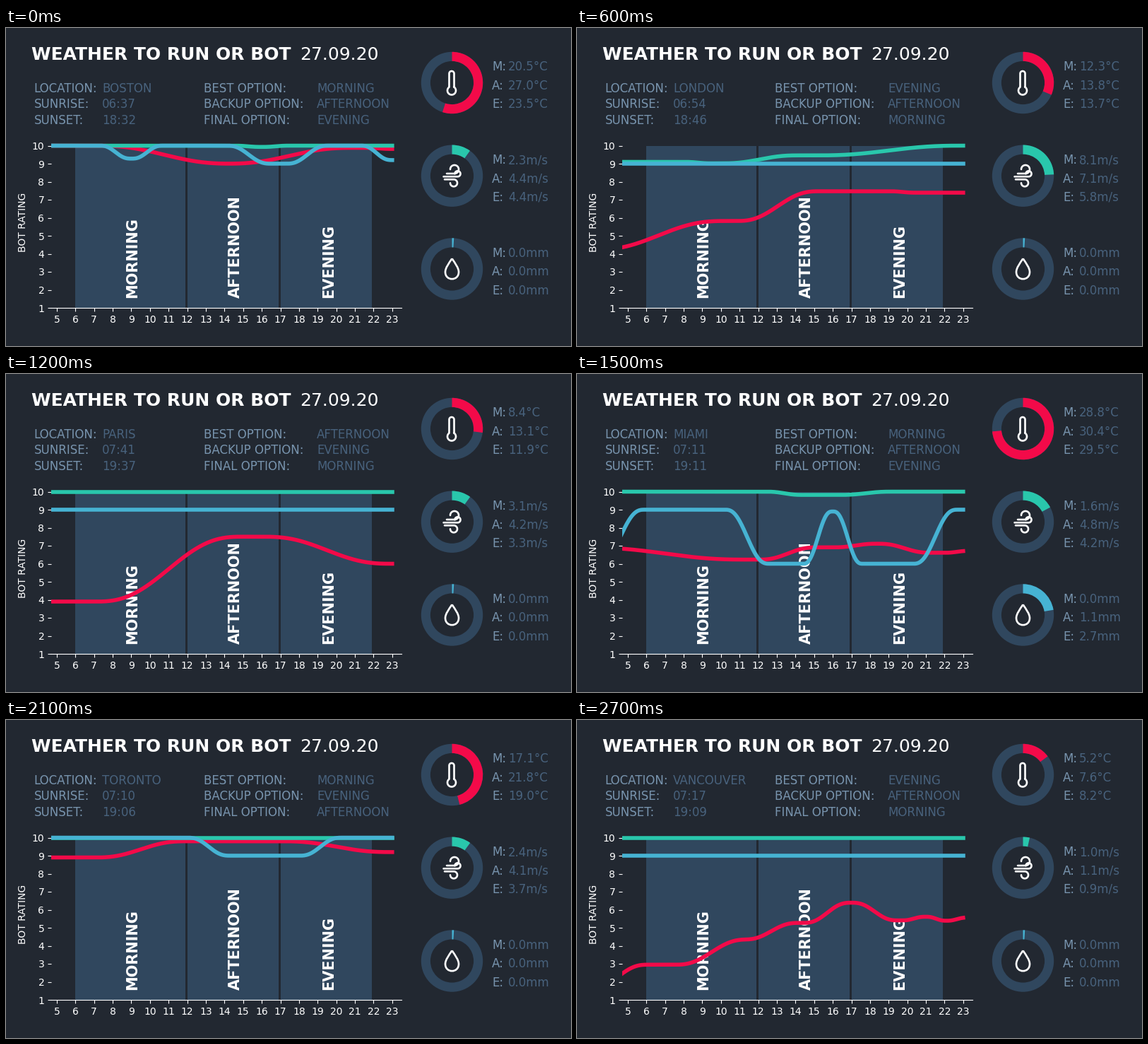
Animation, 800 px wide and 450 px high, one loop 3000 ms. Source, as a matplotlib script:

```python
import matplotlib.pyplot as plt
import numpy as np
from matplotlib.animation import FuncAnimation
from matplotlib.patches import PathPatch, Rectangle, Wedge
from matplotlib.path import Path

W, H, DPI = 800, 450, 100
BACK, PANEL = "#222831", "#30475e"
LABEL, VALUE = "#7894ae", "#48627d"
RED, TEAL, BLUE = "#f30a49", "#29c7ac", "#46b3d3"
PERIODS = {"M": "MORNING", "A": "AFTERNOON", "E": "EVENING"}
RING_X, RING_Y = 631.5, (77.5, 209.2, 341)
UNITS = ("°C", "m/s", "mm")

plt.rcParams["font.family"] = "DejaVu Sans"
cities = []


def curve(level, *moves, start=4):
    """Rating over the day: each move eases by `change` between two hours."""
    hours = np.linspace(start, 23, 500)
    ratings = np.full_like(hours, level)
    for begin, end, change in moves:
        t = np.clip((hours - begin) / (end - begin), 0, 1)
        ratings += change * t**3 * (6 * t * t - 15 * t + 10)
    return hours, ratings


def city(name, sunrise, sunset, order, temps, winds, rains=(0, 0, 0), *,
         heat, wind, red, teal=curve(10), blue=curve(9)):
    rain = max(0.01, sum(rains) / 17)
    cities.append(dict(facts=(name, sunrise, sunset), order=order,
                       readings=(temps, winds, rains),
                       shares=(heat, wind, rain), curves=(red, teal, blue)))


city("BOSTON", "06:37", "18:32", "MAE", (20.5, 27.0, 23.5), (2.3, 4.4, 4.4),
     heat=.55, wind=.099,
     red=curve(10, (7, 14.5, -1), (14, 21, .88), (21.5, 23, -.06)),
     teal=curve(10, (14.5, 16, -.07), (16, 17.5, .07)),
     blue=curve(10, (7.3, 9, -.72), (9, 10.7, .72), (14.1, 16.5, -1),
                (17.3, 19.6, 1), (21.3, 23, -.8)))

city("CHICAGO", "06:44", "18:40", "AME", (16.2, 19.4, 16.8), (3.6, 4.9, 5.2),
     heat=.41, wind=.13,
     red=curve(8.2, (7, 14, 1.6), (15, 23, -1.2)),
     blue=curve(10, (15, 17.3, -1)))

city("LONDON", "06:54", "18:46", "EAM", (12.3, 13.8, 13.7), (8.1, 7.1, 5.8),
     heat=.314, wind=.243,
     red=curve(4.22, (3, 10.3, 1.6), (10.8, 15.3, 1.65), (19, 20.5, -.08)),
     teal=curve(9.1, (8, 9.5, -.08), (10, 14.2, .44), (15, 23, .54)))

city("EDINBURGH", "07:08", "18:58", "AEM", (5.6, 11.0, 9.7), (1.3, 0.8, 1.1),
     heat=.198, wind=.023,
     red=curve(2.35, (5, 7, -.65), (6.8, 12.8, 4.7), (12, 15.5, .95),
               (16, 22.7, -2.85)),
     blue=curve(10, (11.4, 13.8, -1)))

city("PARIS", "07:41", "19:37", "AEM", (8.4, 13.1, 11.9), (3.1, 4.2, 3.3),
     heat=.27, wind=.1,
     red=curve(3.9, (7, 15, 3.6), (16, 23, -1.5)))

city("MIAMI", "07:11", "19:11", "MAE", (28.8, 30.4, 29.5), (1.6, 4.8, 4.2),
     (0, 1.1, 2.7), heat=.736, wind=.172,
     red=curve(6.9, (2.5, 11.5, -.67), (12, 15.2, .68), (16, 18.4, .2),
               (18.4, 21.3, -.5), (22, 23.3, .1)),
     teal=curve(10, (12.4, 14.4, -.18), (16.3, 19.2, .18)),
     blue=curve(6, (3.3, 5.9, 3), (10.2, 12.6, -3), (14.4, 16, 2.9),
                (16, 17.6, -2.9), (20.3, 22.7, 3)))

city("NEW YORK", "06:48", "18:44", "EMA", (21.6, 25.3, 23.6), (1.5, 3.6, 3.5),
     heat=.566, wind=.08,
     red=curve(9.82, (5.3, 7, .05), (7, 13.7, -.58), (14, 17.3, .21),
               (17.8, 19.2, .1), (22, 23, .07)),
     blue=curve(10, (8.2, 10.9, -1), (13.1, 15.6, 1), (21.3, 23, -.8)))

city("TORONTO", "07:10", "19:06", "MEA", (17.1, 21.8, 19.0), (2.4, 4.1, 3.7),
     heat=.46, wind=.1,
     red=curve(8.9, (7, 12, .9), (17, 23, -.6)),
     blue=curve(10, (12, 14.3, -1), (18, 20.3, 1)))

city("TOKYO", "05:32", "17:31", "AME", (20.8, 24.4, 23.1), (2.8, 2.8, 3.8),
     (.9, 0, 1.8), heat=.566, wind=.07,
     red=curve(10, (9.5, 14, -.4), (14.5, 17.2, .2), (19.5, 21, .08),
               (21, 22.4, -.17), start=7),
     teal=curve(10, start=7),
     blue=curve(8.6, (6.8, 8.5, -2.6), (8.5, 10.5, 3), (18.3, 21.2, -4),
                start=7))

city("VANCOUVER", "07:17", "19:09", "EAM", (5.2, 7.6, 8.2), (1.0, 1.1, 0.9),
     heat=.148, wind=.035,
     red=curve(1.58, (2.8, 6.1, 1.37), (7.5, 11.5, 1.4), (11.2, 14.2, .92),
               (14.4, 17, 1.12), (17, 19.5, -.98), (19.7, 21, .2),
               (21, 22.1, -.22), (22.1, 23.2, .17)))

fig = plt.figure(figsize=(W / DPI, H / DPI), dpi=DPI, facecolor=BACK)


def write(x, y, text="", color=VALUE, size=12, **style):
    return fig.text(x / W, 1 - y / H, text, color=color, fontsize=size, **style)


# Rating chart
chart = fig.add_axes([0.08, 0.12, 0.62, 242.25 / H])
chart.set(xlim=(4.7, 23.5), ylim=(1, 10.5), facecolor="none",
          xticks=range(5, 24), yticks=range(1, 11))
chart.set_ylabel("BOT RATING", color="white")
chart.tick_params(colors="white")
chart.spines[["left", "top", "right"]].set_visible(False)
chart.spines["bottom"].set_color("white")
for start, end, middle, text in ((6, 11.9, 9.07, "MORNING"),
                                 (12, 16.9, 14.6, "AFTERNOON"),
                                 (17, 21.9, 19.6, "EVENING")):
    chart.add_patch(Rectangle((start, 1), end - start, 9, color=PANEL, lw=0))
    chart.text(middle, 1.55, text, color="white", size=15, weight="bold",
               rotation=90, ha="center", va="bottom", zorder=1.5)
lines = [chart.plot([], [], color=c, lw=4, solid_capstyle="projecting",
                    zorder=3)[0] for c in (RED, TEAL, BLUE)]

# Rings and icons, in stage pixels
stage = fig.add_axes([0, 0, 1, 1], facecolor="none")
stage.set(xlim=(0, W), ylim=(H, 0))
stage.axis("off")


def ring(y, share, color):
    return stage.add_patch(Wedge((RING_X, y), 43.7, -90, -90 + 360 * share,
                                 width=13.1, color=color, lw=0))


def stroke(x, y):
    stage.plot(x, y, color="white", lw=1.9, solid_capstyle="round",
               solid_joinstyle="round")


def arc(cx, cy, r, start, end):
    a = np.radians(np.linspace(start, end, 40))
    return cx + r * np.cos(a), cy + r * np.sin(a)


def gust(x, y, cx, r, side):
    """A straight breeze ending in a curl, upwards for side -1."""
    ax, ay = arc(cx, y + side * r, r, -90 * side, 180 * side)
    stroke(np.r_[x, ax], np.r_[y, ay])


for y in RING_Y:
    ring(y, 1, PANEL)
wedges = [ring(y, 0.01, c) for y, c in zip(RING_Y, (RED, TEAL, BLUE))]

bulb, tip = arc(631, 88.5, 6, -54, 234), arc(631, 64.5, 3.5, 180, 360)
stroke(np.r_[bulb[0], tip[0], bulb[0][0]], np.r_[bulb[1], tip[1], bulb[1][0]])
gust(624, 206, 635, 6, -1)
gust(619.5, 210.3, 639.5, 4, -1)
gust(621, 214.3, 634, 5, 1)
drop = [(631.5, 326.3), (636, 333), (641, 339.5), (641, 345.3),
        (641, 358.5), (622, 358.5), (622, 345.3),
        (622, 339.5), (627, 333), (631.5, 326.3)]
stage.add_patch(PathPatch(Path(drop, [Path.MOVETO] + [Path.CURVE4] * 9),
                          fc="none", ec="white", lw=1.9))

# Text
write(36, 45, "WEATHER TO RUN OR BOT", "white", 18, weight="bold")
write(416, 45, "27.09.20", "white", 18)
rows = [90.7 + 22.5 * k for k in range(3)]
for y, left, right in zip(rows, ("LOCATION:", "SUNRISE:", "SUNSET:"),
                          ("BEST OPTION:", "BACKUP OPTION:", "FINAL OPTION:")):
    write(39.5, y, left, LABEL)
    write(279.5, y, right, LABEL)
facts = [write(136, y) for y in rows]
options = [write(440, y) for y in rows]
readings = []
for y in RING_Y:
    for k, key in enumerate(PERIODS):
        base = y - 17 + 26.4 * k
        write(688, base, key + ":", LABEL)
        readings.append(write(711, base))


def update(frame):
    c = cities[frame]
    for line, points in zip(lines, c["curves"]):
        line.set_data(*points)
    for wedge, share in zip(wedges, c["shares"]):
        wedge.set_theta2(-90 + 360 * share)
    values = [f"{v:.1f}{unit}" for group, unit in zip(c["readings"], UNITS)
              for v in group]
    choices = [PERIODS[key] for key in c["order"]]
    for text, value in zip(facts + options + readings,
                           [*c["facts"], *choices, *values]):
        text.set_text(value)
    return []


animation = FuncAnimation(fig, update, frames=len(cities), interval=300,
                          repeat=True, repeat_delay=0)
plt.show()
```
